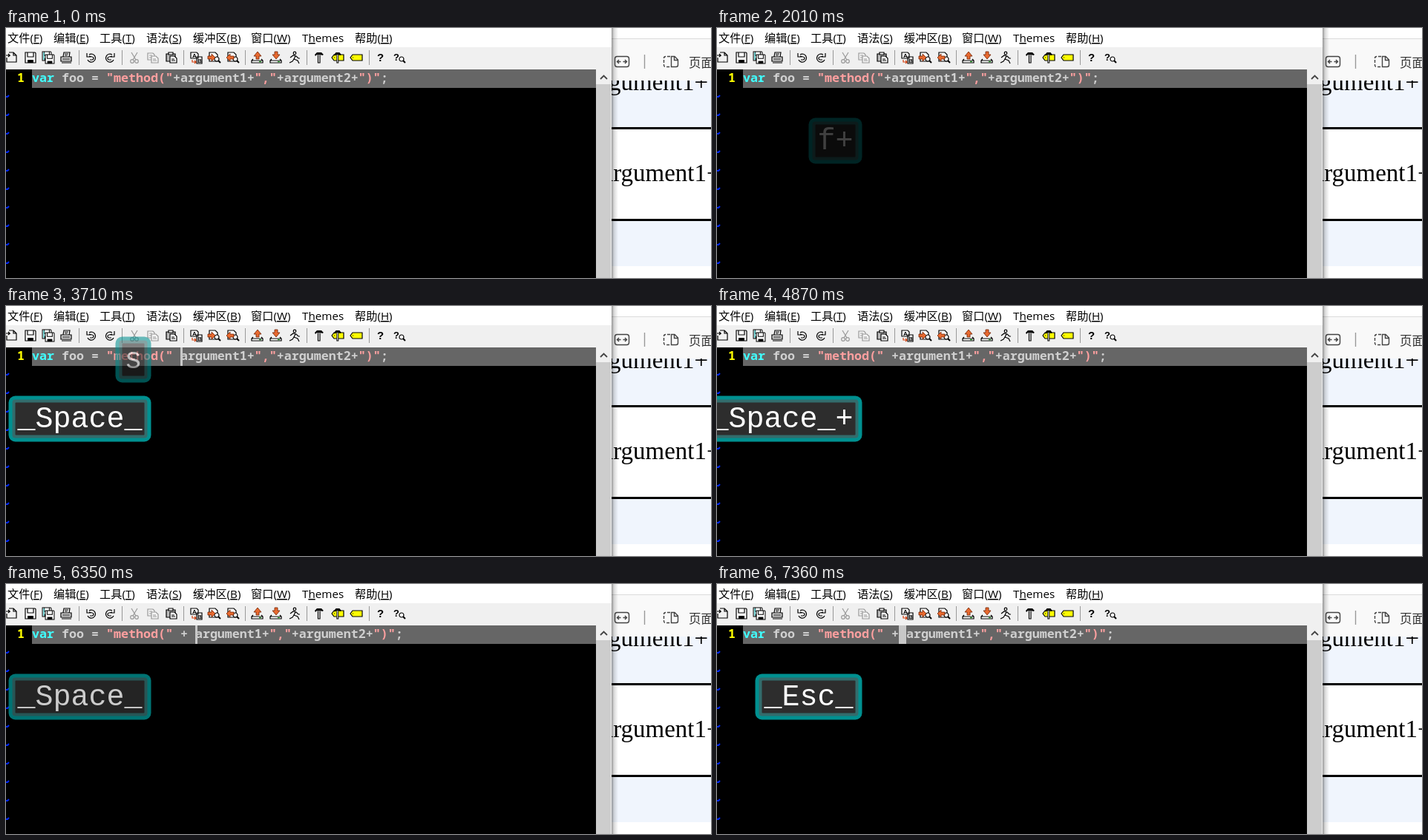
Animation, 950 px wide and 338 px high, one loop 8 s. Source, as an HTML page:

```html
<!DOCTYPE html>
<html lang="zh">
<meta charset="utf-8">
<title>Editor</title>
<style>
html, body { margin: 0; width: 100%; height: 100%; overflow: hidden; background: #fff }
svg { display: block; width: 950px; height: 338px }
text { white-space: pre }
.code { font: bold 16.667px "Noto Sans Mono", "DejaVu Sans Mono", monospace; fill: #d0d0d0 }
.str { fill: #ffa0a0 }
.menu { font: 15.200px "Open Sans", "Noto Sans CJK SC", "Noto Sans CJK", sans-serif }
.menu .u { text-decoration: underline }
.page { font: 33px "Liberation Serif", serif }
.key { font: 40px "Liberation Mono", monospace; fill: #fff }
.icon { fill: none; stroke: #000; stroke-width: 1.2 }
.icon text { font: bold 8px "Liberation Sans", sans-serif; fill: #000; stroke: none }
.icon .q { font-size: 15px }
.gray { stroke: #999 }
</style>
<svg viewBox="0 0 950 338">
  <defs>
    <linearGradient id="shade">
      <stop stop-color="#000" stop-opacity=".4"/><stop offset=".4" stop-color="#000" stop-opacity=".14"/><stop offset="1" stop-color="#000" stop-opacity="0"/>
    </linearGradient>
    <clipPath id="sheet"><path d="M816 71H950V338H816Z"/></clipPath>
  </defs>

  <!-- page on the right -->
  <path fill="#fff" d="M816 0H950V338H816Z"/>
  <path fill="#f9f9f9" d="M816 14H950V71H816Z"/>
  <path fill="#dcdcdc" d="M816 14H950V15H816Z"/>
  <path fill="#f0f5fd" d="M816 71H950V134H816ZM816 261H950V322H816Z"/>
  <path d="M816 134H950V137H816ZM816 258H950V261H816Z"/>
  <g class="page" clip-path="url(#sheet)">
    <text x="787" y="84">argument1+</text>
    <text x="803.500" y="207">argument1+</text>
  </g>
  <g fill="none" stroke="#444" stroke-width="1.4">
    <rect x="820.5" y="38.500" width="19" height="14" rx="3"/>
    <path d="M823.500 45.500H828.500M826 43L823.500 45.500L826 48M831.500 45.500H836.500M834 43L836.500 45.500L834 48"/>
    <path stroke="#999" d="M860.500 36V55"/>
    <path d="M895 38.500H889Q886.500 38.500 886.500 41V50Q886.500 52.500 889 52.500H895" stroke-dasharray="4 2"/>
    <path d="M896.500 38.500H901L905.500 43V50Q905.500 52.500 903 52.500H896.500ZM900.500 38.500V43.500H905.500"/>
  </g>
  <text class="menu" x="920" y="52.500" style="font-size:16.500px" fill="#333">页面视图</text>
  <path fill="url(#shade)" d="M816 0H825V338H816Z"/>

  <!-- editor window -->
  <path fill="#fff" d="M0 0H816V26H0Z"/>
  <path fill="#f0f0f0" d="M0 26H816V338H0Z"/>
  <path d="M0 56H795V338H0Z"/>
  <path fill="#666" d="M35 56H795V81H35Z"/>
  <path fill="#cdcdcd" d="M795 76H815V338H795Z"/>
  <path fill="none" stroke="#444" stroke-width="1.800" d="M801 69L805.500 64.500L810 69"/>
  <g id="menu" class="menu"></g>
  <g id="bar"></g>
  <g id="tildes" fill="none" stroke="#0028ff" stroke-width="2"></g>
  <text class="code" x="15" y="73" style="fill:#ff0">1</text>
  <text class="code" x="35" y="73"><tspan fill="#40ffff">var</tspan> foo = <tspan class="str">"method("</tspan><tspan id="typed">+</tspan>argument1+<tspan class="str">","</tspan>+argument2+<tspan class="str">")"</tspan>;</text>
  <rect id="caret" y="56" height="25" fill="#c8c8c8"/>
  <text id="under" class="code" y="73" style="fill:#000"></text>
  <g id="keys"></g>
</svg>
<script>
const $ = id => document.getElementById(id);

$('menu').innerHTML = [
  [2, '文件(', 'F', ')'], [64, '编辑(', 'E', ')'], [126, '工具(', 'T', ')'], [189, '语法(', 'S', ')'],
  [252, '缓冲区(', 'B', ')'], [330, '窗口(', 'W', ')'], [399, 'T', 'h', 'emes'], [470, '帮助(', 'H', ')']
].map(([x, a, u, b]) => `<text x="${x}" y="19">${a}<tspan class="u">${u}</tspan>${b}</text>`).join('');

const path = (d, more = '') => `<path d="${d}" ${more}/>`;
const solid = 'fill="#000" stroke="none"', orange = 'fill="#e86a30" stroke="#702000" stroke-width=".8"', yellow = 'fill="#ff0"';
const floppy = path('M-7-7H6L7-6V7H-7Z', 'fill="#fff"') + path('M-4-7V-1H4V-7') + path('M-4 7V3H4V7Z', solid);
const turn = path('M-3-4A5.500 5.500 0 1 1-5 3M-6-6V-1H-1M-2 3H1A2 2 0 0 0 1-1L-3-2');
const sheets = path('M-7-6H0L2-4V3H-7ZM-5-3H-1M-5 0H0', 'fill="#f4f4f4"') + path('M-2-2H4L7 1V7H-2ZM0 2H4M0 4H5', 'fill="#f4f4f4"');
const lens = '<circle cx="3" cy="2" r="3" fill="#fff"/>' + path('M5 4L8 7', 'stroke-width="2"');
const found = path('M-7-7H1L4-4V5H-7Z', 'fill="#fff"') + lens;
const tray = path('M-6 2L-8 4V7H7V4L5 2M-8 4H7', 'fill="#fff"') + path('M2 5.500H5', 'stroke="#080"');
const tag = path('M-8 0L-5-4H8V4H-5Z', yellow) + path('M-5 0H-4');
const hammer = path('M-6-4L-3-7H3L6-4L4-3L2-4H-3L-5-2Z', solid) + path('M-1.500-4V7H1V-4', 'fill="#fff"');

const icons = [
  [8, path('M-8-3H-3L-5-5M-3-3L-5-1') + path('M-4-7H2L6-3V6H-7V0M2-7V-3H6')],
  [33, floppy],
  [57, `<g transform="translate(-2 -2) scale(.85)">${floppy}</g><g transform="translate(2 2) scale(.85)">${floppy}</g>` + path('M-6-7V3', 'stroke="#3cc"')],
  [81, path('M-4-1L-3-7H5L4-1', 'fill="#fff"') + path('M-2-5H3M-2-3H2') + path('M-7-1H7V5H-7Z', 'fill="#ddd"') + path('M-6 7H7M-5 2H5')],
  [115, turn],
  [140, `<g transform="scale(-1 1)">${turn}</g>`],
  [173, path('M-4-7L2 3M4-7L-2 3') + '<circle cx="-3" cy="5" r="2.300"/><circle cx="3" cy="5" r="2.300"/>', 'gray'],
  [198, sheets, 'gray'],
  [223, path('M-7-5H5V5H-7Z', 'fill="#bbb"') + path('M-4-7H2V-4H-4Z', 'fill="#fff"') + path('M-2-2H4L7 1V7H-2ZM0 2H4M0 4H5', 'fill="#fff"')],
  [257, path('M-8-7H0L2-5V1H-8ZM0-1H7V8H0Z', 'fill="#fff"') + '<text x="-6" y="0">A</text><text x="1" y="7">B</text>' + path('M-6 3V6H-1M-3 4L-1 6L-3 8', 'stroke="#d04010"')],
  [281, found + path('M-9-2H-4V-5L1 0L-4 5V2H-9Z', orange)],
  [306, found + path('M1-2H-4V-5L-9 0L-4 5V2H1Z', orange)],
  [339, tray + path('M-2 2V-2H-5L0-8L5-2H2V2Z', orange)],
  [364, tray + path('M-2-8V-4H-5L0 2L5-4H2V-8Z', orange)],
  [389, '<circle cx="0" cy="-6" r="1.800"/>' + path('M-6 0L-2-3L2-2L5 1H7M1-2L-1 2L4 4L6 8M-1 2L-3 5L-7 7')],
  [422, hammer],
  [447, tag + `<g transform="scale(.8 1)">${hammer}</g>`],
  [472, tag],
  [505, '<text class="q" x="-5" y="5">?</text>'],
  [530, '<text class="q" x="-8" y="4" style="font-size:13px">?</text>' + lens]
];
$('bar').innerHTML = icons.map(([x, body, cls = '']) =>
  `<g class="icon ${cls}" transform="translate(${x} 40)">${body}</g>`).join('') +
  [98, 156, 239, 322, 405, 489].map(x => path(`M${x}.500 30V50`, 'stroke="#999"')).join('');

for (let y = 92; y < 338; y += 25)
  $('tildes').innerHTML += path(`M0 ${y + 1}H2L4 ${y - 1}`);

// [time, text between the string and argument1]
const typing = [[0, '+'], [2550, ''], [3560, ' '], [4170, ' +'], [5350, ' + ']];

// [time, x, width, letter below]; no x means blinked off
const carets = [
  [0], [130, 35, 10, 'v'], [680, 225, 10, '+'], [1390], [1610, 225, 10, '+'], [2010], [2320, 225, 10, '+'],
  [2550, 225, 3], [3250], [3480, 225, 3], [3560, 235, 3], [4170, 245, 3], [4870], [5120, 245, 3],
  [5350, 255, 3], [6040], [6270, 255, 3], [6650], [6880, 255, 3], [7360, 245, 10]
];

const keys = [
  { label: 'f', from: 130, to: 680 },
  { label: 'f+', from: 680, to: 2090, fade: [1690, 1780, 1930, 2010] },
  { label: 's', from: 2550, to: 3940, up: 3560, fade: [3560, 3710, 3790, 3870] },
  { label: '_Space_', from: 3560, to: 4170 },
  { label: '_Space_+', from: 4170, to: 5580, up: 5350, fade: [5200, 5270, 5350, 5500] },
  { label: '_Space_', from: 5350, to: 6730, fade: [6350, 6420, 6570, 6650] },
  { label: '_Esc_', from: 7360, to: 8000 }
];
const levels = [1, .8, .57, .42, .25];

for (const k of keys) {
  const w = k.label.length * 24, x = 183.500 - w;
  const box = (inset, r, fill) => `<rect x="${x - 12 + inset}" y="${121.500 + inset}" width="${w + 24 - 2 * inset}" height="${62 - 2 * inset}" rx="${r}" fill="${fill}"/>`;
  k.node = document.createElementNS('http://www.w3.org/2000/svg', 'g');
  k.node.innerHTML = box(0, 9, '#009090') + box(5, 4, '#336c6c') + box(9, 1, '#2d2d2d') +
    `<text class="key" x="${x}" y="164">${k.label}</text>`;
  $('keys').append(k.node);
}

const latest = (list, t) => list.filter(e => e[0] <= t).pop();

function draw() {
  const t = performance.now() % 8000;
  $('typed').textContent = latest(typing, t)[1];

  const [, x = 0, width = 0, letter = ''] = latest(carets, t);
  $('caret').setAttribute('x', x);
  $('caret').setAttribute('width', width);
  $('under').setAttribute('x', x);
  $('under').textContent = letter;

  for (const { node, from, to, up = to, fade = [] } of keys) {
    node.setAttribute('display', t >= from && t < to ? 'inline' : 'none');
    node.setAttribute('opacity', levels[fade.filter(f => f <= t).length]);
    node.setAttribute('transform', `translate(0 ${t >= up ? -80 : 0})`);
  }
  requestAnimationFrame(draw);
}
draw();
</script>
</html>
```
